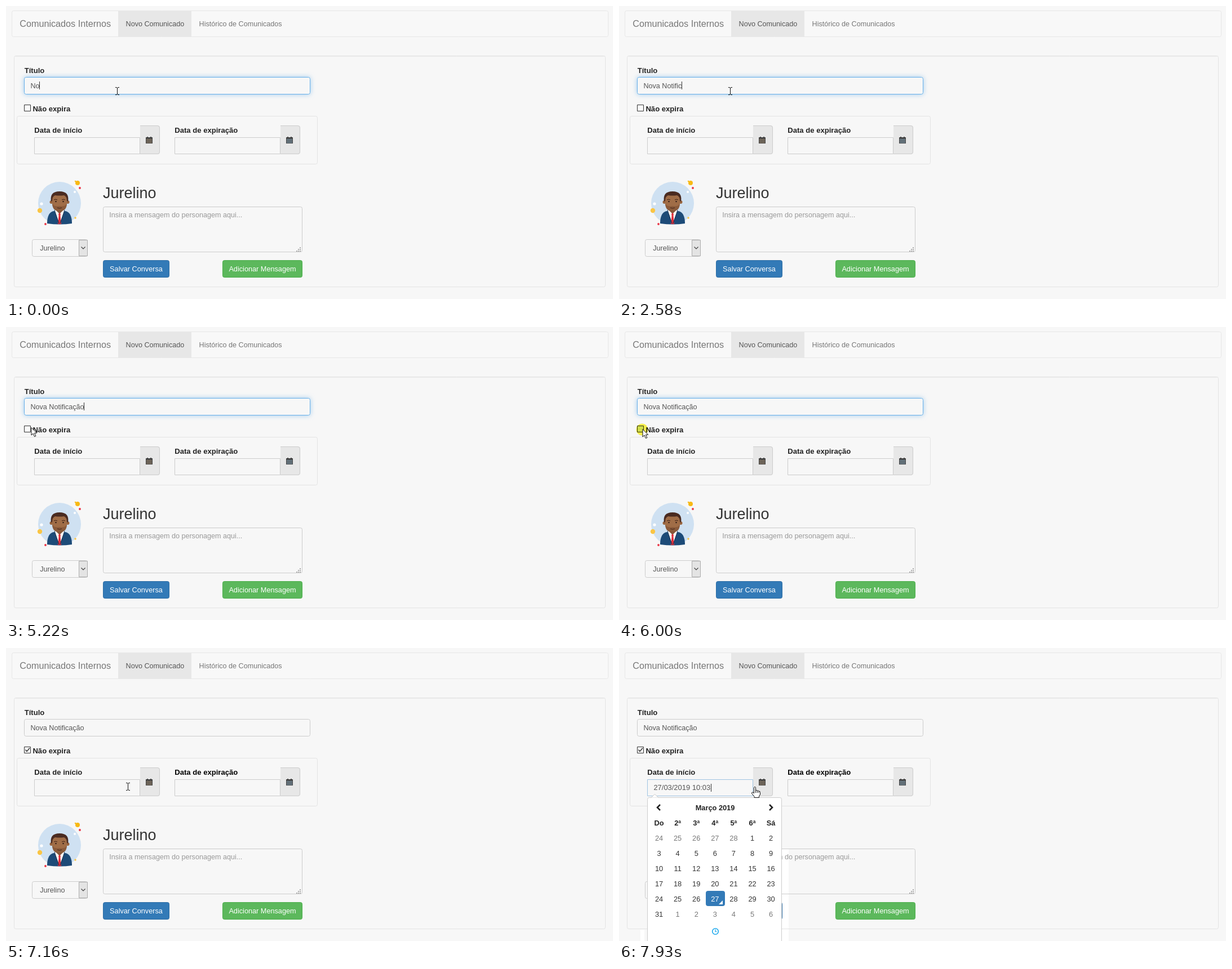
Animation of 1077 by 520 pixels, one loop 8000 ms. Source, as an HTML page with a canvas:

```html
<!DOCTYPE html>
<html lang="pt-BR">
<head>
<meta charset="utf-8">
<title>Comunicados Internos</title>
<style>
html, body { margin: 0; width: 100%; height: 100%; overflow: hidden; background: #f7f7f7; }
canvas { display: block; }
</style>
</head>
<body>
<canvas id="stage" width="1077" height="520"></canvas>
<script>
const ctx = document.getElementById('stage').getContext('2d');
const LOOP = 8000;
const FONT = '"Liberation Sans", Arial, sans-serif';
const PAPER = '#f7f7f7', INK = '#222', GREY = '#555', LINE = '#ccc', PALE = '#e3e3e3';
const PERSON = 'Jurelino';
const TITLE = 'Nova Notificação';

// Time at which each further letter of the title appears; two are there at the start.
const KEYS = [150, 320, 400, 1090, 1320, 2020, 2170, 2340, 2410, 2580, 2810, 2960, 3280, 3360];
// The caret toggles at each of these times, starting visible.
const BLINKS = [780, 1090, 1870, 2020, 3510, 3970, 4520, 4990, 5450, 5690, 5990];
const PRESS = 6000, CHECK = 6150, OPEN = 7860;

// Pointer path: time, hot spot x, y, shape.
const PATH = [
  [0, 198, 151, 'beam'], [4520, 198, 151, 'beam'], [4600, 167, 150, 'beam'],
  [4680, 77, 161, 'arrow'], [4750, 66, 158, 'arrow'], [4920, 57, 168, 'arrow'],
  [5150, 46, 177, 'arrow'], [5450, 41, 180, 'arrow'], [5690, 42, 181, 'arrow'],
  [6230, 42, 181, 'arrow'], [6310, 104, 241, 'beam'], [6390, 140, 252, 'beam'],
  [6460, 157, 254, 'beam'], [6540, 168, 253, 'beam'], [6770, 187, 249, 'beam'],
  [7080, 210, 247, 'beam'], [7300, 228, 243, 'beam'], [7400, 241, 236, 'hand'],
  [7690, 252, 238, 'hand'], [7860, 252, 238, 'hand'], [7930, 241, 246, 'hand'],
  [LOOP, 241, 246, 'hand']
];

const count = (list, t) => list.filter(at => t >= at).length;

function text(str, x, y, color = GREY, size = 12.6, weight = 'normal', align = 'left') {
  ctx.font = `${weight} ${size}px ${FONT}`;
  ctx.textAlign = align;
  ctx.fillStyle = color;
  ctx.fillText(str, x, y);
}

function label(str, x, y, color = INK) {
  text(str, x, y, color, 13.1, 'bold');
}

function rect(x, y, w, h, color) {
  ctx.fillStyle = color;
  ctx.fillRect(x, y, w, h);
}

function box(x, y, w, h, radius, stroke, fill) {
  ctx.beginPath();
  ctx.roundRect(x + .5, y + .5, w - 1, h - 1, radius);
  if (fill) { ctx.fillStyle = fill; ctx.fill(); }
  ctx.lineWidth = 1;
  ctx.strokeStyle = stroke;
  ctx.stroke();
}

function dot(x, y, r, color) {
  ctx.fillStyle = color;
  ctx.beginPath();
  ctx.arc(x, y, r, 0, 7);
  ctx.fill();
}

function line(points, color, width = 1) {
  ctx.beginPath();
  points.forEach(([x, y]) => ctx.lineTo(x, y));
  ctx.strokeStyle = color;
  ctx.lineWidth = width;
  ctx.stroke();
}

function shape(d, fill, stroke, x = 0, y = 0) {
  const path = new Path2D(d);
  ctx.save();
  ctx.translate(x, y);
  if (fill) { ctx.fillStyle = fill; ctx.fill(path); }
  if (stroke) { ctx.lineWidth = 1; ctx.strokeStyle = stroke; ctx.stroke(path); }
  ctx.restore();
}

function drawNav() {
  box(10, 8, 1059, 47, 3, '#e7e7e7', '#f8f8f8');
  rect(199, 9, 130, 45, '#e7e7e7');
  text('Comunicados Internos', 24.2, 37, '#777', 16.2);
  text('Novo Comunicado', 212.6, 36);
  text('Histórico de Comunicados', 342.6, 36, '#777');
}

function drawTitle(t) {
  const focus = 1 - Math.min(1, Math.max(0, (t - CHECK) / 150));
  label('Título', 32.7, 119);
  ctx.save();
  ctx.shadowColor = `rgba(102,175,233,${.6 * focus})`;
  ctx.shadowBlur = 8;
  ctx.beginPath();
  ctx.roundRect(32, 126, 508, 31, 4);
  ctx.fillStyle = PAPER;
  ctx.fill();
  ctx.restore();
  const mix = (from, to) => Math.round(from + (to - from) * focus);
  box(32, 126, 508, 31, 3, `rgb(${mix(204, 102)},${mix(204, 175)},${mix(204, 233)})`);

  const typed = TITLE.slice(0, 2 + count(KEYS, t));
  text(typed, 43.4, 146);
  if (t < PRESS && count(BLINKS, t) % 2 === 0) {
    rect(Math.floor(43.4 + ctx.measureText(typed).width), 134, 1, 14, '#333');
  }
}

function drawCheckbox(t) {
  const pressed = t >= PRESS && t < CHECK;
  box(32, 175, 12, 12, 0, '#333', pressed ? '#d5e8f0' : '#fafafa');
  if (t >= CHECK) line([[34.5, 180.5], [37, 183.5], [42, 177.5]], '#222', 1.3);
  label('Não expira', 47.4, 187);
}

function drawDateField(x, str, color, stripe, border) {
  label(str, x + .2, 225, color);
  ctx.beginPath();
  ctx.roundRect(x + 188, 212, 35, 51, [0, 4, 4, 0]);
  ctx.fillStyle = '#e7e7e7';
  ctx.fill();
  shape('M0 .5 H31 Q34.5 .5 34.5 4 V47 Q34.5 50.5 31 50.5 H0', null, LINE, x + 188, 212);
  box(x, 233, 188, 30, 0, border, PAPER);
  const left = x + 198;
  rect(left, 233, 12, 11, '#444');
  rect(left + 2, 232, 2, 2, '#444');
  rect(left + 8, 232, 2, 2, '#444');
  for (let i = 0; i < 4; i++) rect(left + 1, 236 + i * 2, 10, 1, stripe);
}

function drawAvatar() {
  dot(95, 350, 38, '#cfe1f2');
  shape('M73 386 Q73 367 84 364 L106 364 Q117 367 117 386 Q96 389 73 386Z', '#1d4b78');
  shape('M86 363 L95 387 L104 363Z', '#fff');
  shape('M89 354 H101 V363 L95 369 L89 363Z', '#85563a');
  shape('M93 369 L95 367 L97 369 L96.5 372 L98 387 H92 L93.5 372Z', '#e0303b');
  shape('M86 362 L94 386 M104 362 L96 386', null, '#14304f');
  dot(80.5, 348, 3, '#98653f');
  dot(109.5, 348, 3, '#98653f');
  shape('M82 336 Q95 331 108 336 V350 Q107 363 95 364 Q83 363 82 350Z', '#a06d47');
  shape('M82 350 Q84 357 95 355 Q106 357 108 350 Q108 364 95 364 Q82 364 82 350Z', '#8a5a3a');
  shape('M80 347 Q77 329 95 329 Q113 329 110 347 L108 346 Q108 338 103 336 Q95 337 87 336 Q82 338 82 346Z', '#4a2b21');
  shape('M85 344 Q88 342 91 344 M99 344 Q102 342 105 344 M91 358 Q95 360 99 358', null, '#402319');
  dot(88.5, 347, 1.2, '#2b1813');
  dot(101.5, 347, 1.2, '#2b1813');
  dot(127, 314, 4, '#f8b914');
  dot(123, 311, 1.2, '#f8b914');
  dot(131, 323, 1.9, '#ea3546');
  dot(122, 330, 2, '#fff');
  dot(63, 351, 2.6, '#fff');
  dot(60, 363, 4.2, '#fac544');
  dot(70, 387, 1.9, '#ea3546');
  dot(123, 376, 1.7, '#fac544');
}

function drawMessage() {
  drawAvatar();
  text(PERSON, 172, 341, '#333', 27);
  box(46, 414, 99, 31, 3, LINE);
  text(PERSON, 60.3, 434);
  box(129, 415, 16, 29, 0, '#adadad', '#e4e4e4');
  line([[133.5, 427.5], [137, 431], [140.5, 427.5]], '#444', 1.2);

  box(172, 356, 354, 81, 3, LINE);
  text('Insira a mensagem do personagem aqui...', 183.3, 375, '#999');
  for (let row = 0; row < 3; row++)
    for (let col = 2 - row; col < 3; col++) rect(515 + col * 3, 428 + row * 3, 2, 2, '#aaa');

  box(172, 451, 118, 31, 3, '#2e6da4', '#337ab7');
  text('Salvar Conversa', 231, 471, '#fff', 12.7, 'normal', 'center');
  box(384, 451, 142, 31, 3, '#4cae4c', '#5cb85c');
  text('Adicionar Mensagem', 455, 471, '#fff', 12.7, 'normal', 'center');
}

function drawCalendar() {
  const centred = (str, x, y, color, weight) => text(str, x, y, color, 12.8, weight, 'center');
  box(50, 265, 239, 270, 3, LINE, '#fff');
  shape('M57 265.5 L63.5 259.5 L70 265.5', '#fff', LINE);
  line([[73, 278], [68, 283], [73, 288]], '#222', 2.6);
  line([[267, 278], [272, 283], [267, 288]], '#222', 2.6);
  centred('Março 2019', 170.5, 287.5, INK, 'bold');

  const column = i => 71 + i * 33.1;
  ['Do', '2ª', '3ª', '4ª', '5ª', '6ª', 'Sá'].forEach((day, i) => centred(day, column(i), 314.5, INK, 'bold'));
  box(154, 431, 34, 27, 3, '#337ab7', '#337ab7');
  shape('M184 448 V455 H177Z', '#fff');
  for (let i = 0; i < 42; i++) {
    const offset = i - 4;
    const day = offset < 1 ? 28 + offset : offset > 31 ? offset - 31 : offset;
    const color = offset < 1 || offset > 31 ? '#777' : offset === 27 ? '#fff' : '#333';
    centred(day, column(i % 7), 341.5 + 27 * Math.floor(i / 7), color, 'normal');
  }
  ctx.beginPath();
  ctx.arc(171, 503, 5.3, 0, 7);
  ctx.strokeStyle = '#1ba8ec';
  ctx.lineWidth = 1.6;
  ctx.stroke();
  line([[171, 499.5], [171, 503.5], [173.5, 503.5]], '#1ba8ec', 1.2);
}

const POINTERS = {
  beam(x, y) {
    shape('M-3 -6.5 H-1 L0.5 -5.5 L2 -6.5 H4 M0.5 -5.5 V5.5 M-3 6.5 H-1 L0.5 5.5 L2 6.5 H4', null, '#111', x - 1, y);
  },
  arrow(x, y) {
    shape('M.5 .5 V14 L3.6 11 L6 16.5 L8.4 15.5 L6 10.2 H10.2Z', '#fff', '#111', x - .5, y);
  },
  hand(x, y) {
    shape('M-1.5 12 V1.5 Q0 -1 1.5 1.5 V7 Q3 5.5 4.3 7.3 Q6 6.3 7 8.2 Q9.5 7.5 9.5 10.5 V14 L7.5 17 V19.5 H-1 V17.5 L-5.5 12 Q-5.5 9.5 -3.5 10Z', '#fff', '#111', x, y);
    shape('M1.5 7 V11 M4.3 7.5 V11 M7 8.5 V11', null, '#111', x, y);
  }
};

function drawPointer(t) {
  if (t >= PRESS && t < CHECK) {
    ctx.save();
    ctx.globalCompositeOperation = 'multiply';
    dot(41, 182, 10.5, '#fbf44f');
    ctx.restore();
  }
  const next = PATH.findIndex(p => p[0] > t);
  const [t0, x0, y0, kind] = PATH[next - 1];
  const [t1, x1, y1] = PATH[next];
  const k = (t - t0) / (t1 - t0);
  POINTERS[kind](Math.round(x0 + (x1 - x0) * k), Math.round(y0 + (y1 - y0) * k));
}

function draw(t) {
  const open = t >= OPEN;
  rect(0, 0, 1077, 520, PAPER);
  if (open) {
    rect(289, 357, 12, 163, '#fff');
    rect(38, 500, 7, 20, '#fff');
  }
  drawNav();
  box(14, 88, 1050, 411, 3, PALE);
  rect(16, 89, 1046, 1, '#ececec');
  drawTitle(t);
  drawCheckbox(t);
  box(19, 195, 534, 86, 3, PALE);
  drawDateField(50, 'Data de início', INK, '#94826c', open ? '#9fc3e2' : LINE);
  drawDateField(299, 'Data de expiração', t >= CHECK ? '#000' : INK, '#7f9aab', LINE);
  drawMessage();
  if (open) {
    text('27/03/2019 10:03', 61.4, 252, GREY, 12.95);
    rect(163, 241, 1, 14, '#333');
    drawCalendar();
  }
  drawPointer(t);
}

const start = performance.now();
function tick() {
  draw((performance.now() - start) % LOOP);
  requestAnimationFrame(tick);
}
tick();
</script>
</body>
</html>
```
